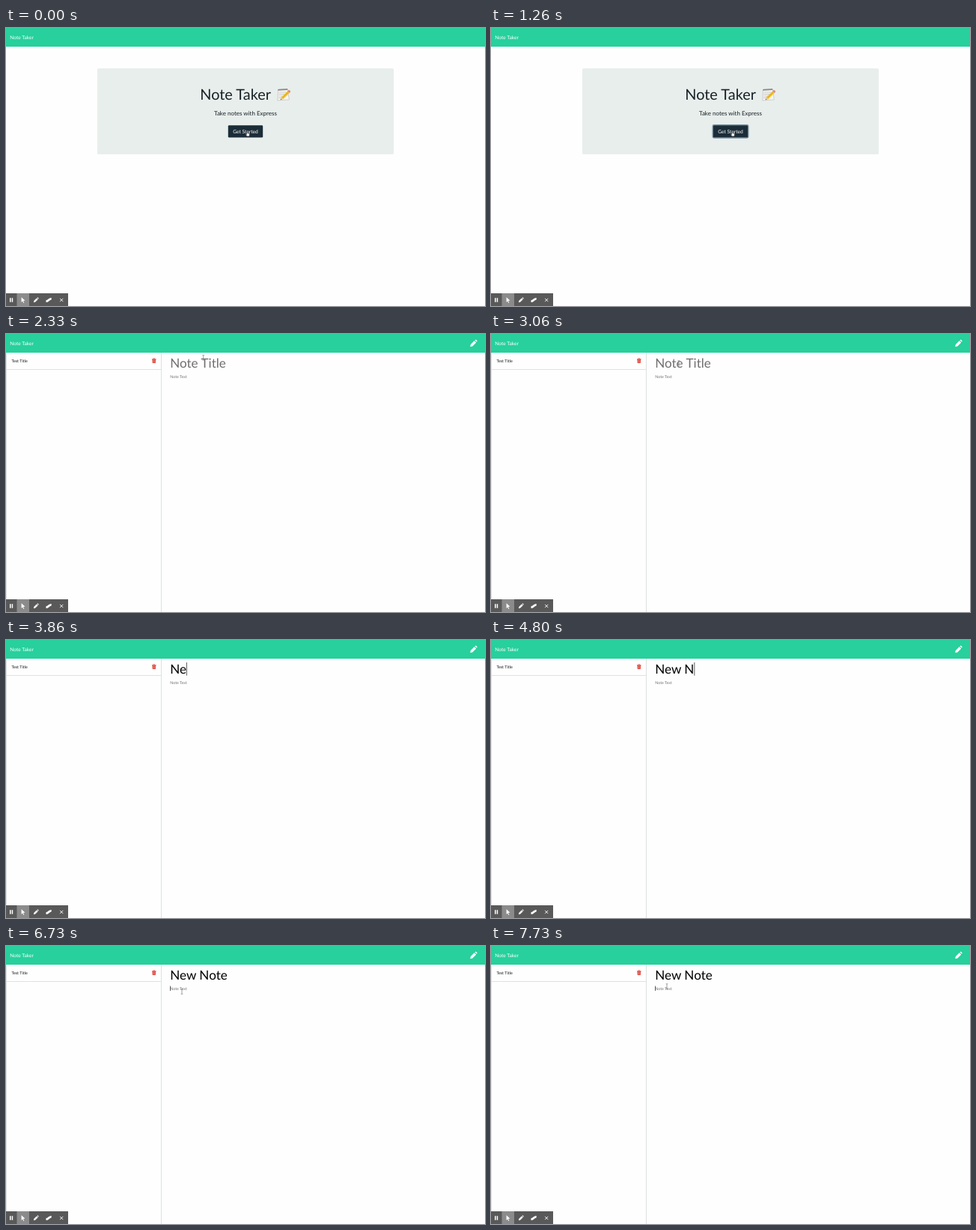
These frames come from a looping animation (640 px wide and 372 px high, 8 s). An HTML page:

```html
<!DOCTYPE html>
<html lang="en">
<head>
<meta charset="utf-8">
<title>Note Taker</title>
<style>
  html, body { margin: 0; width: 100%; height: 100%; overflow: hidden; background: #fdfefd; }
  svg { display: block; width: 640px; height: 372px; }
  text { font-family: Lato, sans-serif; white-space: pre; text-rendering: geometricPrecision; }
  .mid { text-anchor: middle; }
  .rule { stroke: #dfe2e2; stroke-width: 1; }
  .caret { stroke: #333; stroke-width: .8; }
</style>
</head>
<body>
<svg viewBox="0 0 640 372">
  <defs>
    <g id="pencil">
      <path d="M-4.3 4.4l.6-2.9 5-5 2.4 2.4-5 5z"/>
      <path d="M2-4.1l.7-.7q.5-.4 1 0l1.2 1.2q.5.5 0 1l-.6.7z"/>
    </g>
  </defs>
  <rect width="640" height="372" fill="#fdfefd"/>
  <rect width="640" height="25" fill="#27d09c"/>
  <text x="5.2" y="14.9" font-size="6.67" fill="#fff">Note Taker</text>

  <g id="landing">
    <rect x="122" y="54" width="396" height="115" rx="1.6" fill="#e8eeec"/>
    <text x="259.3" y="96" font-size="19.9" fill="#192227">Note Taker</text>
    <g id="memo">
      <path d="M363.5 82.2l12.6-.7 2.3 14.4-15.6 1z" fill="#f5f5f3" stroke="#b5b8b8" stroke-width=".6"/>
      <path d="M363.4 82.8l12.8-.7" stroke="#8b8883" stroke-width="1.8"/>
      <path d="M364.5 86h10M364.3 88.5h8M364.2 91h6M364 93.5h4" stroke="#b4b9bc" stroke-width=".7"/>
      <path d="M366.6 96.3l1.4-4 8.1-7.9 2.7 2.7-8.2 7.8z" fill="#f2c632"/>
      <path d="M369.3 93.6l8.1-7.9" stroke="#d79a1c" stroke-width=".9"/>
      <path d="M366.6 96.3l1.4-4 2.6 2.6z" fill="#e9c69a"/>
      <path d="M366.6 96.3l.5-1.4.9.9z" fill="#333"/>
      <path d="M376.1 84.4l1.2-1.1q1.2-.6 2.2.5.9 1.100.400 2.200l-1.100 1.100z" fill="#dc8b86"/>
    </g>
    <text class="mid" x="320" y="116.900" font-size="8" fill="#192227">Take notes with Express</text>
    <rect id="ring" x="296.200" y="129.700" width="47.600" height="17.400" rx="1.800" fill="none" stroke="#7890a0" stroke-width="1.300"/>
    <rect x="296.800" y="130.300" width="46.400" height="16.200" rx="1.300" fill="#1b2d38"/>
    <text class="mid" x="320" y="140.700" font-size="6.670" fill="#fff">Get Started</text>
  </g>

  <g id="notes">
    <path class="rule" d="M.5 25V372M207.500 25V372"/>
    <use href="#pencil" x="624.500" y="12.500" fill="#fff"/>
    <g id="list">
      <path class="rule" d="M0 47.500H207"/>
      <text x="7.400" y="38.200" font-size="5.400" fill="#15191b">Test Title</text>
      <path d="M195 32.900h1.700l.4-.6h1.400l.4.600h1.700v.8H195zM195.300 34.100h5l-.3 4.200q0 .6-.7.600h-3q-.7 0-.7-.6z" fill="#e0524a"/>
      <path d="M196.700 35v3.100M197.800 35v3.100M198.900 35v3.100" stroke="#f0a19b" stroke-width=".35"/>
    </g>
    <text id="title" x="219.200" y="44.900" font-size="17.100"></text>
    <text x="219.200" y="58.900" font-size="5.330" fill="#757575">Note Text</text>
    <path id="titleCaret" class="caret" d="M.4 30V47.600"/>
    <path id="bodyCaret" class="caret" d="M219.600 53.500V60"/>
  </g>

  <path id="hand" d="M-1.500-3.600q.7-.7 1.200.1v2.200l2 .4q.9.300.8 1.200l-.5 2.600h-3L-2.700.600q-.1-.9 1.200-.2z" fill="#fff" stroke="#333" stroke-width=".65"/>
  <path id="beam" d="M-1.300-3.500Q0-3.500 0-2.700V2.700Q0 3.500-1.300 3.500M1.300-3.500Q0-3.500 0-2.700M0 2.700Q0 3.500 1.300 3.500" fill="none" stroke="#777" stroke-width=".7"/>

  <g fill="#fff" stroke="none">
    <rect y="355" width="83" height="17" fill="#595959"/>
    <rect x="14.500" y="355" width="16.500" height="17" fill="#8b8b8b"/>
    <path d="M5 361.200h1.500v5.600H5zM7.700 361.200h1.500v5.600H7.700z"/>
    <path d="M20.600 360.300l4.800 4.500-2.300.2 1.200 2.400-1 .5-1.100-2.500-1.600 1.500z"/>
    <use href="#pencil" transform="translate(40 364) scale(.72)"/>
    <path d="M53.500 364.300q1.700-.3 3.200-1.700 1.700-1.500 4-1.600v2.600q-1.800.4-3.300 1.800-1.700 1.600-3.900 1.700z"/>
    <path d="M72.100 361.900l4.200 4.200M76.300 361.900l-4.200 4.200" stroke="#fff" stroke-width=".9"/>
  </g>
</svg>
<script>
const LOOP = 8000, FPS = 15, BLINK = 500;
const OPEN_PAGE = 1400, LIST_LOADED = 1460, BODY_FOCUS = 6690;
const TEXT = 'New Note';
const focusTime = 2530;
const keyTimes = [3600, 3860, 4000, 4460, 4730, 5200, 5260, 5400];
// Pointer path: time, x, y
const path = [
  [1800, 323, 142], [2066, 267, 30], [2200, 267, 30], [2800, 252, 38],
  [5930, 238, 49], [6200, 235, 52.5], [6600, 235, 52.5], [6733, 235, 61], [6866, 235, 54]
];
const $ = id => document.getElementById(id);
const show = (id, on) => $(id).setAttribute('visibility', on ? 'inherit' : 'hidden');
const move = (id, x, y) => $(id).setAttribute('transform', `translate(${x} ${y})`);
const blinkOn = age => age >= 0 && Math.floor(age / BLINK) % 2 === 0;

function pointerAt(t) {
  const next = path.findIndex(p => p[0] > t);
  if (next === 0) return path[0].slice(1);
  if (next < 0) return path.at(-1).slice(1);
  const [t0, x0, y0] = path[next - 1], [t1, x1, y1] = path[next];
  const k = (t - t0) / (t1 - t0);
  return [x0 + (x1 - x0) * k, y0 + (y1 - y0) * k];
}

function draw(now) {
  const t = Math.floor(now % LOOP * FPS / 1000 + 0.1) * 1000 / FPS;
  const opened = t >= OPEN_PAGE - 1;
  show('landing', !opened);
  show('notes', opened);
  show('list', t >= LIST_LOADED);
  $('ring').setAttribute('opacity', Math.min(1, Math.max(0, (t - 870) / 390)));

  const typed = keyTimes.filter(k => k <= t);
  const title = $('title');
  const value = TEXT.slice(0, typed.length);
  title.textContent = value || 'Note Title';
  title.setAttribute('fill', value ? '#000' : '#6f6f6f');
  const width = value ? title.getComputedTextLength() : 0;
  move('titleCaret', 219.2 + width, 0);
  show('titleCaret', t < BODY_FOCUS && blinkOn(t - (typed.at(-1) ?? focusTime)));
  show('bodyCaret', blinkOn(t - BODY_FOCUS));

  const [x, y] = pointerAt(t);
  const hand = t < 1860, typing = t >= keyTimes[0] && t < 5930;
  move('hand', x, y);
  move('beam', x, y);
  show('hand', hand);
  show('beam', !hand && !typing);
}

const start = performance.now();
function tick() {
  draw(performance.now() - start);
  requestAnimationFrame(tick);
}
tick();
</script>
</body>
</html>
```
